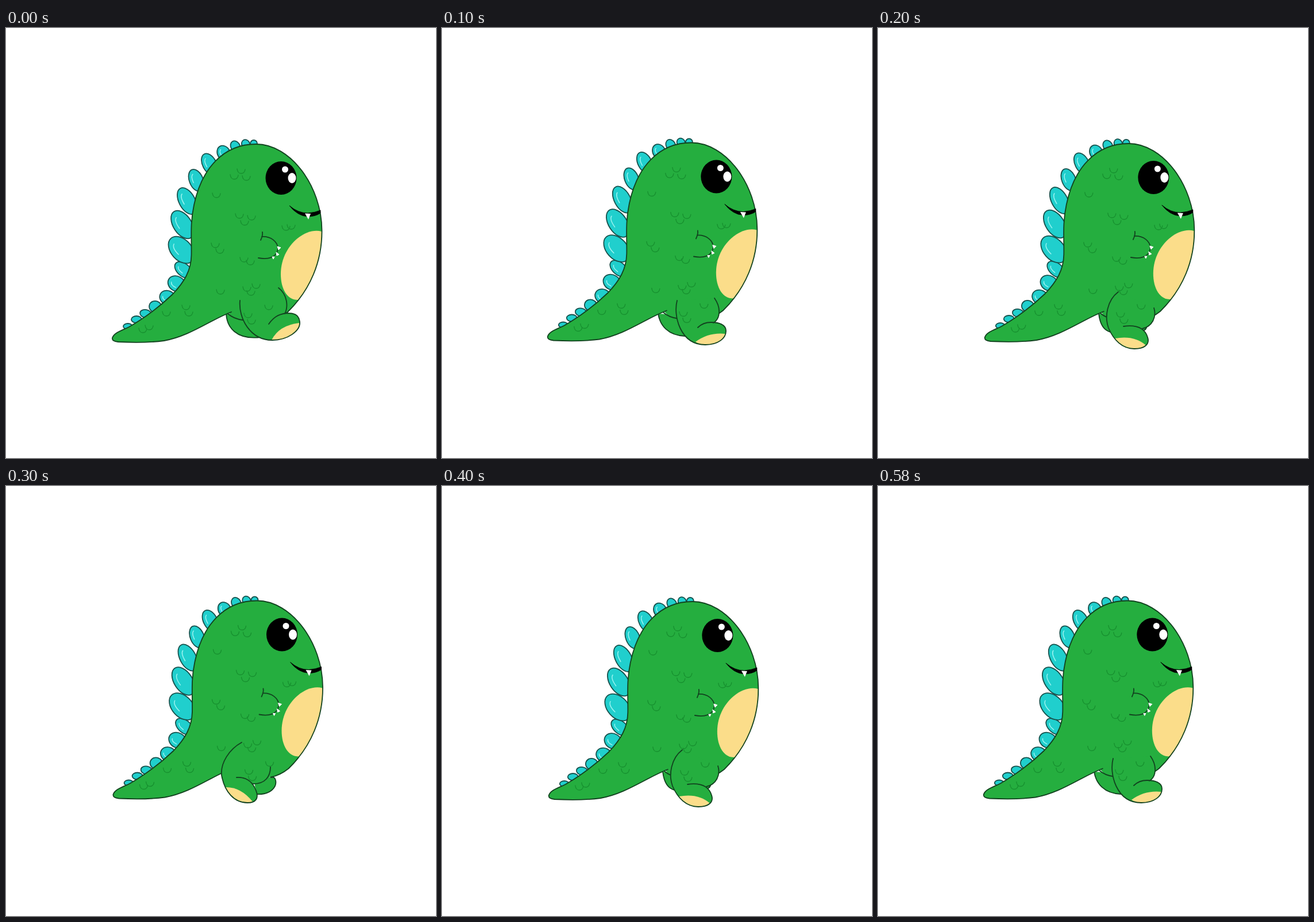
Recreate the animation shown at these times as an HTML page. Size 748x748 px, loop 0.63 s.

```html
<!DOCTYPE html>
<html lang="en">
<head>
<meta charset="utf-8">
<title>Walking dinosaur</title>
<style>
  html, body { margin: 0; width: 100%; height: 100%; overflow: hidden; background: #fff; }
  svg { display: block; width: 100vw; height: 100vh; }
  .skin { fill: #25ae3f; }
  .cream { fill: #fbdd8a; }
  .ink { fill: none; stroke: #12421f; stroke-width: 1.8; stroke-linecap: round; stroke-linejoin: round; }
  #spikes ellipse { fill: #20cfcd; stroke: #17514c; stroke-width: 1.8; }
  #spikes path { fill: none; stroke: #9cf3f0; stroke-width: 1.5; stroke-linecap: round; }
  #scales { fill: none; stroke: #17902f; stroke-width: 1.4; stroke-linecap: round; }
</style>
</head>
<body>
<svg viewBox="0 0 748 748">
  <g>
    <path id="backFill" class="skin"/>
    <path id="backLine" class="ink"/>
  </g>
  <g class="bob">
    <g id="spikes"></g>
    <path class="skin" d="M185 539C188 530 200 527 214 520C240 505 266 486 290 463C310 442 322 422 322.500 395C323 365 320 340 327 308C340 245 378 202 435 202C495 202 549 275 549.500 352C550 405 530 455 490 494Q475 506 459 509L412 508Q396 506 388 496C355 508 320 536 275 544C245 548 215 547 195 546Q184 545 185 539"/>
    <path class="cream" d="M549 354C520 346 478 380 478 428C478 455 490 474 509 473C535 442 549 400 549 354"/>
    <path class="ink" d="M412 508Q396 506 386 497M459 509Q475 506 490 494C530 455 550 405 549.500 352C549 275 495 202 435 202C378 202 340 245 327 308C320 340 323 365 322.500 395C322 422 310 442 290 463C266 486 240 505 214 520C200 527 188 530 185 539Q184 545 195 546C215 547 245 548 275 544C320 536 355 508 392 494"/>
    <ellipse cx="478.500" cy="261" rx="27" ry="29"/>
    <g fill="#fff">
      <circle cx="485.500" cy="246" r="5.500"/>
      <ellipse cx="497.500" cy="261" rx="7" ry="9"/>
    </g>
    <path d="M493 309Q508 322 525 322Q538 321 547 317V322Q538 328 525 328Q507 327 493 309" stroke="#000" stroke-width=".8"/>
    <path fill="#fff" d="M520 322.500L530 323L526 333Z"/>
    <path class="ink" d="M446 355Q447 361 443 369M445 363C461 362 473 372 473 384C471 400 455 403 439 400"/>
    <path fill="#fff" d="M472 380L478 382L474 386ZM470 390L475 394L471 396ZM463 398L467 398L465 402Z" stroke="#fff"/>
  </g>
  <g>
    <path id="legFill" class="skin"/>
    <path id="toe" class="cream"/>
    <path id="legLine" class="ink"/>
  </g>
  <path id="scales" class="bob"/>
</svg>
<script>
const $ = id => document.getElementById(id);

// Back spikes from tail to head: x, y, long radius, short radius, tilt
const spikes = [
  [212, 519, 8, 5, 0], [227, 507, 9, 6, 0], [243, 497, 10, 7, 10], [260, 485, 11, 10, 20],
  [281, 469, 14, 12, 25], [297, 445, 16, 13, 30], [309, 421, 18, 11, 40], [305, 386, 27, 18, 48],
  [307, 342, 27, 16, 57], [315, 301, 25, 14, 62], [331, 265, 20, 12, 68], [354, 237, 20, 12, 63],
  [379, 218, 14, 11, 60], [399, 206, 10, 8, 60], [417, 202, 8, 7, 60], [431, 201, 6, 6, 0]
];
$('spikes').innerHTML = spikes.map(([x, y, a, b, tilt]) =>
  `<g transform="translate(${x} ${y}) rotate(${tilt})"><ellipse rx="${a}" ry="${b}"/>` +
  (a > 11 ? `<path d="M${-a * .6} ${b * .15}Q${-a * .5} ${b * .55} ${a * .1} ${b * .5}"/>` : '') + '</g>'
).join('');

const scales = [
  [409, 249], [397, 259], [418, 261], [366, 291], [406, 327], [427, 330], [415, 339],
  [364, 378], [372, 388], [487, 348], [496, 346], [414, 403], [425, 408], [373, 459],
  [419, 454], [435, 449], [426, 461], [457, 486], [421, 500], [427, 511],
  [279, 497], [313, 486], [318, 497], [238, 526], [249, 521]
];
$('scales').setAttribute('d', scales.map(([x, y]) => `M${x - 7} ${y - 4}q1 8 7 8q6 0 7-7`).join(''));

// leg runs hip to heel to instep; knee runs upwards
const poses = [
  {
    bob: [0, 0],
    back: '383 497C384 520 400 543 443 538',
    leg: '407 474C404 505 425 543 463 543C490 543 512 527 511 512C510 497 499 496 488 496C472 498 464 505 457 515',
    knee: '485 497C491 485 490 464 474 452',
    toe: '462 543Q475 517 511 513C511 527 490 544 462 543'
  }, {
    bob: [-1.2, -2.5],
    back: '376 497C379 517 393 535 423 536',
    leg: '409 474C402 500 414 551 458 551C480 551 494 540 494 527C494 516 482 512 468 512C457 512 450 516 445 521',
    knee: '472 513C484 506 486 487 474 470',
    toe: '441 546Q464 529 493 532C489 546 474 551 458 551Q449 551 441 546'
  }, {
    bob: [.8, -1],
    back: '384 497C386 515 392 526 405 529L460 526Q466 527 468 518',
    leg: '418 459C398 474 394 503 401 522C410 543 425 558 446 558C464 558 473 550 469 538C464 522 449 516 427 519',
    knee: '460 523C477 519 485 503 480 487',
    toe: '412 540Q446 534 466 552C459 560 429 562 412 540'
  }, {
    bob: [1.5, -2.5],
    back: '461 507C469 504 471 515 468 522C462 533 450 537 435 536',
    leg: '410 446C388 458 373 482 375 503C380 532 397 551 420 551C435 551 440 543 435 530C429 514 417 506 401 507',
    knee: '428 518C452 519 460 504 460 489',
    toe: '381 524Q408 523 429 549C416 553 395 549 381 524'
  }
];
const order = [0, 1, 2, 3, 2, 1];

function draw(now) {
  const step = Math.min(5, Math.floor(now % 630 / 100));
  const { bob, back, leg, knee, toe } = poses[order[step]];
  const paths = {
    backFill: `M${back}L430 500Z`, backLine: `M${back}`,
    legFill: `M${leg}L${knee}Z`, legLine: `M${leg}M${knee}`,
    toe: `M${toe}Z`
  };
  for (const id in paths) $(id).setAttribute('d', paths[id]);
  for (const el of document.querySelectorAll('.bob')) el.setAttribute('transform', `translate(${bob})`);
}

const start = performance.now();
function tick() {
  draw(performance.now() - start);
  requestAnimationFrame(tick);
}
tick();
</script>
</body>
</html>
```
